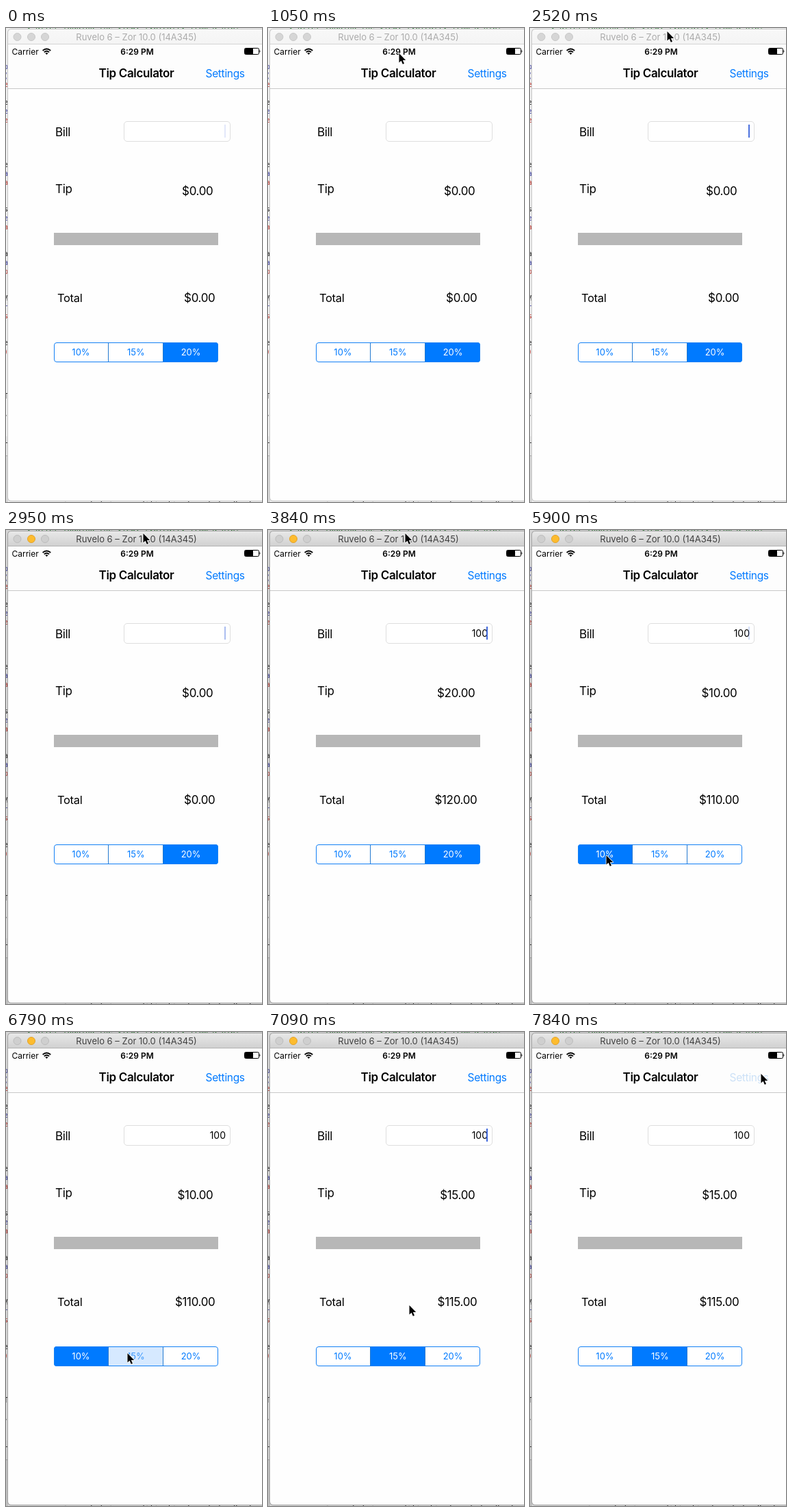
These frames come from a looping animation (374 px wide and 692 px high, 7990 ms). An HTML page:

```html
<!DOCTYPE html>
<html lang="en">
<head>
<meta charset="utf-8">
<title>Tip Calculator</title>
<style>
  html, body { margin: 0; width: 100%; height: 100%; overflow: hidden; background: #fff; }
  svg { display: block; width: 374px; height: 692px; }
  text { font-family: Inter, Roboto, "Liberation Sans", sans-serif; white-space: pre; }
  .code text { font: 11px "DejaVu Sans Mono", "Liberation Mono", monospace; }
  .edge { fill: #c4c4c4; }
  .bar { fill: url(#idle); }
  .rule { fill: #d4d4d4; }
  .title { font-size: 13px; text-anchor: middle; fill: #ababab; }
  .light { fill: #d6d6d6; stroke: #c8c8c8; }
  .active .edge { fill: #a2a2a2; }
  .active .bar { fill: url(#focus); }
  .active .rule { fill: #b3b3b3; }
  .active .title { fill: #404040; }
  .active .light { fill: #cfcfcf; stroke: #bcbcbc; }
  .active .light.mid { fill: #fdbc2f; stroke: #e2a32c; }
  .shade { opacity: .06; }
  .active .shade { opacity: .16; }
  .status { font-size: 12px; }
  .label { font-size: 17px; letter-spacing: -.02em; }
  .end { text-anchor: end; }
  .link { font-size: 15.5px; letter-spacing: -.02em; fill: #007aff; }
  .pressed .link { fill: #cce1f7; }
  .seg rect { fill: #fff; }
  .seg text { font-size: 13px; text-anchor: middle; fill: #007aff; }
  .seg.tint rect { fill: #d6e9ff; }
  .seg.tint text { fill: #3d98fb; }
  .seg.on rect { fill: #007aff; }
  .seg.on text { fill: #fff; }
</style>
</head>
<body>
<svg id="stage" viewBox="0 0 374 692">
  <defs>
    <linearGradient id="idle" x2="0" y2="1">
      <stop stop-color="#f8f8f8"/><stop offset="1" stop-color="#f4f4f4"/>
    </linearGradient>
    <linearGradient id="focus" x2="0" y2="1">
      <stop stop-color="#e8e8e8"/><stop offset="1" stop-color="#d0d0d0"/>
    </linearGradient>
    <clipPath id="segments"><rect x="70" y="459" width="240" height="29" rx="4"/></clipPath>
  </defs>

  <g class="code" id="code">
    <rect width="374" height="692" fill="#fff"/>
    <rect y="596" width="3" height="96" fill="#f3f3f3"/>
    <rect y="624" width="3" height="1" fill="#b5b5b5"/>
    <rect y="625" width="3" height="67" fill="#e4e4e4"/>
    <text x="30" y="1.5" fill="#2c8a34">y after loading the view, typically from a nib.</text>
    <text x="4" y="697.5" fill="#222">r params, using substrings modification/punch feedback</text>
  </g>
  <rect class="shade" width="374" height="692"/>

  <path class="edge" d="M2 7q0-6 6-6H374V691H8q-6 0-6-6z"/>
  <path d="M3 24H374V690H8q-5 0-5-5z" fill="#fefefe"/>
  <path class="bar" d="M3 24V7q0-5 5-5H374V24z"/>
  <rect class="rule" x="3" y="23" width="371" height="1"/>
  <circle class="light" cx="16.5" cy="13" r="5.5"/>
  <circle class="light mid" cx="37" cy="13" r="5.5"/>
  <circle class="light" cx="57" cy="13" r="5.5"/>
  <text class="title" x="190.5" y="18">Ruvelo 6 – Zor 10.0 (14A345)</text>

  <rect x="3" y="24" width="371" height="64" fill="#fdfdfd"/>
  <rect x="3" y="88" width="371" height="1" fill="#c9c9c9"/>
  <text class="status" x="8.5" y="38.5">Carrier</text>
  <g fill="none" stroke="#000" stroke-width="1.8">
    <path d="M53.6 33q5.8-5 11.6 0M55.7 35.4q3.7-3.2 7.4 0"/>
    <path d="M57.3 36.8q2.1-1.8 4.2 0L59.4 39z" fill="#000" stroke="none"/>
  </g>
  <text class="status" x="191.5" y="38.5" font-weight="600" text-anchor="middle">6:29 PM</text>
  <rect x="348.5" y="29.5" width="21" height="9" rx="1.8" fill="#fff" stroke="#000"/>
  <rect x="349" y="30" width="12" height="8" fill="#000"/>
  <path d="M370.5 32q2 2 0 4z"/>
  <text class="label" x="190.5" y="72" font-weight="600" text-anchor="middle">Tip Calculator</text>
  <text class="link" x="291.5" y="72">Settings</text>

  <text class="label" x="72" y="158">Bill</text>
  <rect x="172.5" y="136.5" width="155" height="29" rx="4.5" fill="#fff" stroke="#dedede"/>
  <text class="end" id="bill" x="321" y="156" font-size="14"></text>
  <rect id="caret" x="319" y="141" width="2" height="19" fill="#4169dc"/>
  <text class="label" x="72" y="241">Tip</text>
  <text class="label end" id="tip" x="302.5" y="244"></text>
  <rect x="70" y="299" width="240" height="18" fill="#b7b7b7"/>
  <text class="label" x="75" y="400" style="font-size:16.5px">Total</text>
  <text class="label end" id="total" x="305.5" y="400"></text>

  <g clip-path="url(#segments)" id="segs"></g>
  <path d="M149.5 460v27M229.5 460v27" stroke="#2479cf"/>
  <rect x="70.5" y="459.5" width="239" height="28" rx="3.5" fill="none" stroke="#1380f5"/>

  <path id="pointer" d="M.5 1V14.6L3.6 11.7 5.8 16.8 8 15.9 5.9 11H10.2z"
        stroke="#fff" stroke-width="1.6" paint-order="stroke" stroke-linejoin="round"/>
</svg>
<script>
const LOOP = 7990, TICKS = 54, LEAD = 25;
const ACTIVATE = 18, OPEN_SETTINGS = 53, POINTER_SHOWN = 4;
const BLINK = 6.76, HOLD = 4;
const NS = 'http://www.w3.org/2000/svg';
const $ = id => document.getElementById(id);

function add(parent, tag, attrs, text = '') {
  const el = document.createElementNS(NS, tag);
  for (const key in attrs) el.setAttribute(key, attrs[key]);
  el.textContent = text;
  return parent.appendChild(el);
}

// Line ends of the editor showing past the left side of the window
const lines = 'p(e eee    eaa  sea  aap  Mrs  e)    T ,  l      l ';
[...lines].forEach((char, i) => {
  const fill = lines[i - 1] === ' ' ? '#222' : lines[i + 1] === ' ' ? '#c83a32' : '#3b3fa8';
  add($('code'), 'text', { x: -3.5, y: 60 + 13 * i, fill }, char);
});

const segs = [10, 15, 20].map((rate, i) => {
  const g = add($('segs'), 'g', { class: 'seg' });
  add(g, 'rect', { x: 70 + 80 * i, y: 459, width: 80, height: 29 });
  add(g, 'text', { x: 109.5 + 80.3 * i, y: 478 }, rate + '%');
  return { g, rate };
});

// Pointer stops, eased from one to the next
const stops = [
  { t: POINTER_SHOWN, x: 214, y: 96 },
  { t: 7, x: 191, y: 36 }, { t: 13, x: 191, y: 36 },
  { t: 16, x: 200, y: 4 }, { t: 29, x: 200, y: 4 },
  { t: 34, x: 158, y: 415 },
  { t: 37, x: 111, y: 474 }, { t: 40, x: 111, y: 474 },
  { t: 45, x: 177, y: 468 }, { t: 47, x: 177, y: 468 },
  { t: 51, x: 362, y: 22 },
  { t: 52, x: 337, y: 60 }
];
const keys = [{ t: -4.46, text: '' }, { t: 23, text: '1' }, { t: 24, text: '10' }, { t: 26, text: '100' }];
const taps = [{ t: -1, rate: 20 }, { t: 38, rate: 10 }, { t: 46, rate: 15 }];

const clamp = v => Math.min(1, Math.max(0, v));
const smooth = u => u * u * (3 - 2 * u);
const latest = (list, t) => list.findLast(e => e.t <= t);
const money = n => '$' + n.toFixed(2);

function pointerAt(t) {
  const a = latest(stops, t) ?? stops[0];
  const b = stops[stops.indexOf(a) + 1] ?? a;
  const u = smooth(clamp((t - a.t) / (b.t - a.t || 1)));
  return [a.x + (b.x - a.x) * u, a.y + (b.y - a.y) * u].map(Math.round);
}

// Solid just after a key press, then fading in and out
function caretAt(idle) {
  if (idle < HOLD) return 1;
  return clamp(.5 + 1.13 * Math.cos(2 * Math.PI * (idle / BLINK - .36)));
}

function draw() {
  const t = Math.floor((performance.now() % LOOP + LEAD) / LOOP * TICKS);
  const key = latest(keys, t);
  const tap = latest(taps, t);
  const { rate } = latest(taps, t - 1);   // a tap takes effect one tick later
  const tip = key.text * rate / 100;

  $('stage').classList.toggle('active', t >= ACTIVATE && t < TICKS);
  $('stage').classList.toggle('pressed', t >= OPEN_SETTINGS);
  $('pointer').setAttribute('transform', `translate(${pointerAt(t)})`);
  $('pointer').setAttribute('opacity', t < POINTER_SHOWN ? 0 : 1);
  $('caret').setAttribute('opacity', caretAt(t - key.t));
  $('bill').textContent = key.text;
  $('tip').textContent = money(tip);
  $('total').textContent = money(+key.text + tip);
  for (const s of segs) {
    s.g.classList.toggle('on', s.rate === rate);
    s.g.classList.toggle('tint', s.rate === tap.rate && tap.rate !== rate);
  }
  requestAnimationFrame(draw);
}
draw();
</script>
</body>
</html>
```
